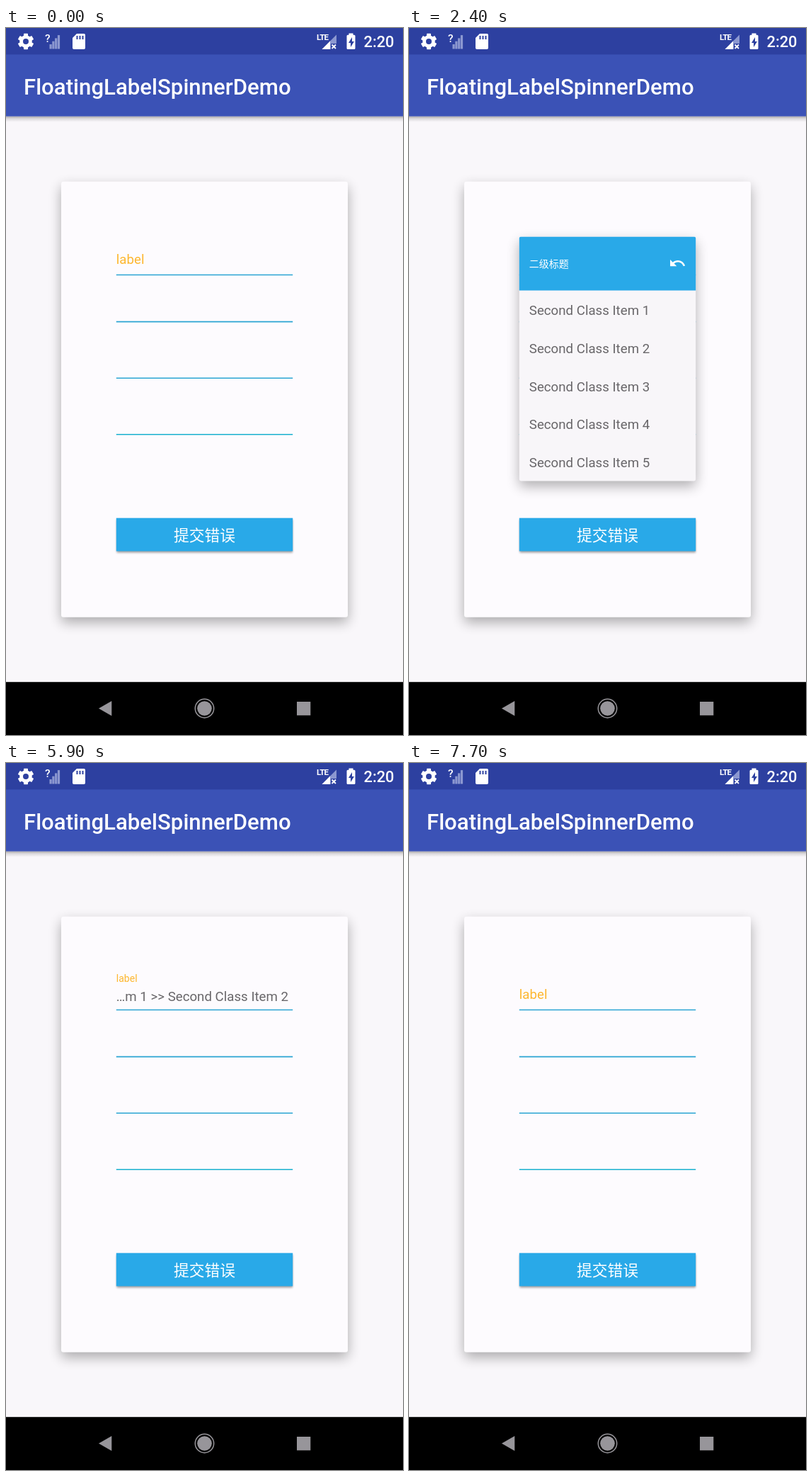
An HTML page for the animation above (7.8 s loop, 561 by 998 pixels).

```html
<!DOCTYPE html>
<html lang="zh-CN">
<head>
<meta charset="utf-8">
<title>Floating label spinner</title>
<style>
html, body { margin: 0; width: 100%; height: 100%; overflow: hidden; background: #f9f7fa; }
svg { display: block; width: 100vw; height: 100vh; }
text { font-family: Roboto, 'Noto Sans CJK SC', 'Noto Sans CJK', sans-serif; white-space: pre; }
.item { font-size: 18.7px; fill: #69676a; }
.head { font-size: 14.03px; fill: #fff; }
.medium { font-weight: 500; fill: #fff; }
</style>
</head>
<body>
<svg viewBox="0 0 561 998" xmlns="http://www.w3.org/2000/svg">
  <defs>
    <filter id="soft" x="-20%" y="-20%" width="140%" height="140%"><feGaussianBlur stdDeviation="9"/></filter>
    <filter id="tight" x="-5%" y="-30%" width="110%" height="160%"><feGaussianBlur stdDeviation="1.6"/></filter>
    <linearGradient id="barShade" x2="0" y2="1">
      <stop offset="0" stop-opacity=".32"/><stop offset=".4" stop-opacity=".12"/><stop offset="1" stop-opacity="0"/>
    </linearGradient>
    <clipPath id="rowClip"><rect id="rowBox" x="155.8" width="249.4" height="53.8"/></clipPath>
  </defs>

  <rect width="561" height="998" fill="#f9f7fa"/>
  <rect y="124.7" width="561" height="8" fill="url(#barShade)"/>
  <rect y="37" width="561" height="87.7" fill="#3b52b6"/>
  <rect width="561" height="37.4" fill="#2d40a0"/>
  <text class="medium" x="25" y="93.6" font-size="31.17">FloatingLabelSpinnerDemo</text>

  <g id="status" fill="#fff">
    <g id="gear" transform="translate(28 19)">
      <circle r="6.4" fill="none" stroke="#fff" stroke-width="4.8"/>
    </g>
    <text class="medium" x="55" y="19.5" font-size="15.5">?</text>
    <g id="bars" fill="#8c98d0"></g>
    <path d="M100 8H110Q112 8 112 10V28Q112 30 110 30H96Q94 30 94 28V14Z"/>
    <path d="M100.5 11v5M104.5 11v5M108.5 11v5" stroke="#2d40a0" stroke-width="2"/>
    <text x="439" y="17.4" font-size="11.5" font-weight="700" letter-spacing="-.9">LTE</text>
    <path d="M467 9.5V22H459V30H446.500Z" fill="#8c98d0"/>
    <path d="M458 18.500V30H446.500Z"/>
    <path d="M460.500 23.500l5.500 5.500m0-5.500l-5.500 5.500" stroke="#fff" stroke-width="1.8"/>
    <path d="M484.500 7.500h6v2.300h1.500q1.500 0 1.500 1.500V28.500q0 1.500-1.500 1.500h-9q-1.500 0-1.500-1.500V11.300q0-1.500 1.500-1.500h1.500z"/>
    <path d="M489 13l-5 8h3v6l5-8h-3z" fill="#2d40a0"/>
    <text class="medium" x="505.5" y="27" font-size="21.8">2:20</text>
  </g>

  <rect x="78" y="224" width="405" height="615" rx="4" opacity=".31" filter="url(#soft)"/>
  <rect x="78" y="216.700" width="405" height="615" rx="3" fill="#fdfbfe"/>

  <g id="lines" stroke-width="1.6"></g>
  <text id="label" fill="#fdb72f">label</text>
  <text id="choice" class="item" x="155.8" y="336.300">…m 1 &gt;&gt; Second Class Item 2</text>

  <rect x="156.500" y="694" width="248.500" height="46.500" opacity=".38" filter="url(#tight)"/>
  <rect x="155.8" y="691.700" width="249.400" height="46.800" fill="#29a9e8"/>
  <text x="280.500" y="723.500" font-size="21.8" fill="#fff" text-anchor="middle">提交错误</text>

  <rect id="shade" x="155.8" y="302" width="249.400" height="345" rx="4" filter="url(#soft)"/>
  <g id="popup">
    <rect x="155.8" y="294.700" width="249.400" height="344.800" rx="3" fill="#f8f6f9"/>
    <path d="M155.800 370.600V296.700q0-2 2-2h245.400q2 0 2 2V370.600z" fill="#29a9e8"/>
    <g id="ripple" clip-path="url(#rowClip)">
      <rect id="rowFill" x="155.8" width="249.400" height="53.800" opacity=".07"/>
      <circle id="wave" cx="299" opacity=".04"/>
    </g>
    <g id="first"></g>
    <g id="second">
      <path transform="translate(367 319.800) scale(1.03)" fill="#fff"
        d="M12.500 8c-2.650 0-5.050.99-6.900 2.600L2 7v9h9l-3.620-3.620c1.390-1.160 3.160-1.880 5.120-1.880 3.540 0 6.550 2.310 7.600 5.500l2.370-.78C21.080 11.030 17.150 8 12.500 8z"/>
    </g>
  </g>

  <rect y="923.200" width="561" height="74.800"/>
  <g fill="#97959a">
    <path d="M131 960.500L149.300 950V971Z"/>
    <circle cx="280.500" cy="960.500" r="10.300"/>
    <circle cx="280.500" cy="960.500" r="13.200" fill="none" stroke="#97959a" stroke-width="1.500"/>
    <rect x="411" y="951" width="19.300" height="19.300"/>
  </g>
</svg>
<script>
const LOOP = 7800, STEP = 100, ROW = 53.85, LIST_TOP = 370.6;
const $ = id => document.getElementById(id);

function add(parent, tag, attrs, text = '') {
  const el = document.createElementNS('http://www.w3.org/2000/svg', tag);
  set(el, attrs);
  el.textContent = text;
  parent.append(el);
}
function set(el, attrs) {
  for (const key in attrs) el.setAttribute(key, attrs[key]);
}

// Linear interpolation through [time, value] points
function track(t, points) {
  if (t <= points[0][0]) return points[0][1];
  for (let i = 1; i < points.length; i++) {
    const [t0, v0] = points[i - 1], [t1, v1] = points[i];
    if (t <= t1) return v0 + (v1 - v0) * (t - t0) / (t1 - t0);
  }
  return points.at(-1)[1];
}

function buildList(group, title, name) {
  add(group, 'text', { class: 'head', x: 169.8, y: 338.3 }, title);
  for (let i = 0; i < 5; i++)
    add(group, 'text', { class: 'item', x: 169.8, y: 404.8 + i * ROW }, `${name} Class Item ${i + 1}`);
}

buildList($('first'), '一级标题', 'First');
buildList($('second'), '二级标题', 'Second');
for (let a = 0; a < 360; a += 60)
  add($('gear'), 'rect', { x: -3, y: -11.2, width: 6, height: 5, rx: .8, transform: `rotate(${a})` });
for (let i = 0; i < 4; i++)
  add($('bars'), 'rect', { x: 61.5 + i * 3.8, y: 23 - i * 4.3, width: 3.2, height: 6.5 + i * 4.3 });
[348.5, 414.6, 494.2, 573.8].forEach((y, i) =>
  add($('lines'), 'path', { d: `M155.8 ${y}H405.2`, stroke: i === 3 ? '#18b0cf' : '#2ba5d3' }));

const popupAlpha = [
  [400, 0], [500, .3], [600, .8], [700, 1],
  [4200, 1], [4300, .86], [4400, .45], [4500, .12], [4600, 0],
  [5900, 0], [6000, .35], [6100, .8], [6200, 1],
  [7100, 1], [7200, .85], [7300, .45], [7400, .12], [7500, 0]
];
const listMix = [[2000, 0], [2300, 1], [6800, 1], [7100, 0]];
const labelLift = [[4200, 0], [4300, 1], [7300, 1], [7400, .9], [7500, .55], [7600, .15], [7700, 0]];

function drawRipple(t) {
  const row = t < 3000 ? 0 : 1;
  const y = LIST_TOP + row * ROW;
  const start = row ? 4200 : 1800;
  const alpha = row ? (t >= 4300 && t < 4600 ? 1 : 0)
                    : track(t, [[1800, 0], [1900, 1], [2100, 1], [2300, 0]]);
  set($('rowBox'), { y });
  set($('rowFill'), { y });
  set($('wave'), { cy: y + ROW / 2, r: Math.max(0, t - start) * 1.07 });
  set($('ripple'), { opacity: alpha });
}

function draw(time) {
  const t = Math.floor(time % LOOP / STEP) * STEP;
  const alpha = track(t, popupAlpha), mix = track(t, listMix), lift = track(t, labelLift);
  set($('popup'), { opacity: alpha });
  set($('shade'), { opacity: alpha * .3 });
  set($('first'), { opacity: 1 - mix });
  set($('second'), { opacity: mix });
  set($('label'), { x: 155.8, y: 333.2 - 24.4 * lift, 'font-size': 18.7 - 4.67 * lift });
  set($('choice'), { opacity: t >= 4300 && t < 7100 ? 1 : 0 });
  drawRipple(t);
}

function frame() {
  draw(performance.now());
  requestAnimationFrame(frame);
}
frame();
</script>
</body>
</html>
```
